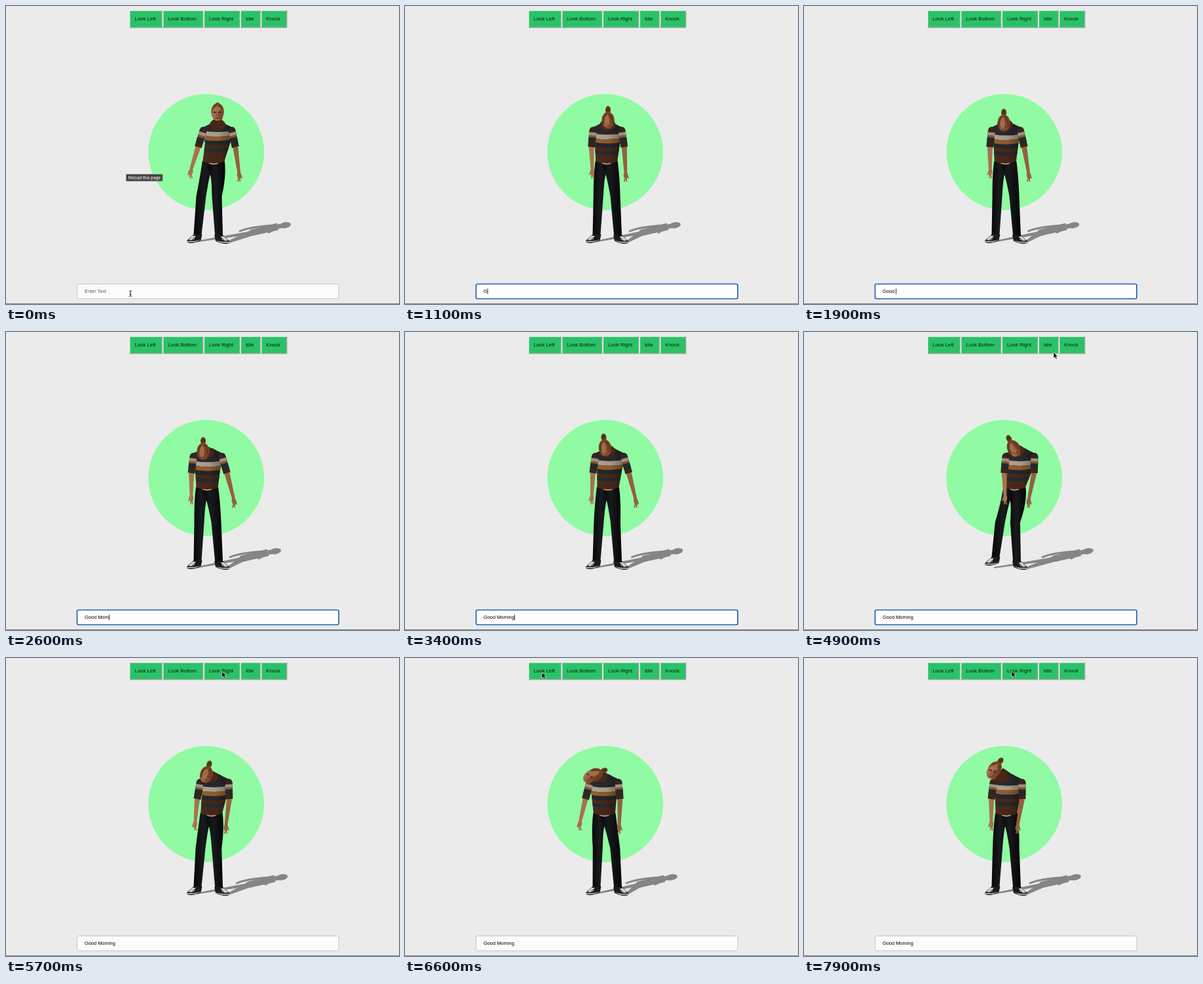
An HTML page that plays this animation: 600x454 px, repeating every 8000 ms.

```html
<!DOCTYPE html>
<html lang="en">
<head>
<meta charset="utf-8">
<title>Text input character</title>
<style>
html, body { margin: 0; width: 100%; height: 100%; overflow: hidden; background: #ebebeb; }
svg { display: block; width: 600px; height: 454px; }
text { font: 7.8px "Liberation Sans", Arial, sans-serif; fill: #0c1a12; white-space: pre; }
#typed { font-size: 7.4px; }
#tip text { font: 500 6.2px Inter, sans-serif; fill: #f4f4f4; }
</style>
</head>
<body>
<svg viewBox="0 0 600 454">
  <defs>
    <linearGradient id="shade">
      <stop offset="0" stop-color="#000" stop-opacity="0"/>
      <stop offset=".55" stop-color="#000" stop-opacity=".08"/>
      <stop offset="1" stop-color="#000" stop-opacity=".4"/>
    </linearGradient>
    <linearGradient id="denim">
      <stop offset="0" stop-color="#060708"/>
      <stop offset=".4" stop-color="#181a1c"/>
      <stop offset="1" stop-color="#050506"/>
    </linearGradient>
  </defs>
  <rect width="600" height="454" fill="#ebebeb"/>
  <rect y="453" width="600" height="1" fill="#7d7d7d"/>
  <circle cx="305.7" cy="222.5" r="88.4" fill="#90fba3"/>
  <g id="buttons"></g>
  <g id="figure"></g>
  <g id="tip">
    <rect x="183.5" y="256.3" width="55.5" height="10.5" fill="#424242" stroke="#777" stroke-width=".7"/>
    <text x="186.8" y="263.7">Reload this page</text>
  </g>
  <rect id="field" x="108.5" y="423.5" width="399.5" height="22.5" rx="2.2"/>
  <text id="typed" x="120" y="437"></text>
  <rect id="caret" y="430.5" width=".8" height="8.5"/>
  <g id="pointer"></g>
</svg>
<script>
const $ = id => document.getElementById(id);
const LOOP = 8000, STEP = 100, MESSAGE = "Good Morning";
const TYPE_START = 1050, TYPE_RATE = 187, TYPE_END = TYPE_START + 11 * TYPE_RATE;
const FOCUS = 500, BLUR = 5200, PRESS = 200;

// Key poses: chest x, head offset, nod, head turn in degrees, reach of each hand from the chest
const POSES = [
  { t: 0,    chest: 323, lean: 0,   nod: 0,   turn: 0,   left: 41, right: 33 },
  { t: 1100, chest: 309, lean: 1,   nod: .7,  turn: 0,   left: 23, right: 28 },
  { t: 2600, chest: 308, lean: -7,  nod: 1.1, turn: 0,   left: 25, right: 40 },
  { t: 4100, chest: 316, lean: -7,  nod: .6,  turn: -13, left: 29, right: 40 },
  { t: 4900, chest: 330, lean: -10, nod: .85, turn: -26, left: 23, right: 13 },
  { t: 6600, chest: 304, lean: -15, nod: .9,  turn: 66,  left: 37, right: 23 },
  { t: 7900, chest: 311, lean: -20, nod: .45, turn: 35,  left: 25, right: 15 }
];
const CURSOR = [
  { t: 0, x: 190, y: 438 }, { t: 3700, x: 190, y: 438 }, { t: 4100, x: 194, y: 422 },
  { t: 4900, x: 381, y: 31 }, { t: 5300, x: 372, y: 20 }, { t: 6500, x: 209, y: 22 },
  { t: 6900, x: 209, y: 22 }, { t: 7900, x: 317, y: 20 }
];

const mix = (a, b, k) => a + (b - a) * k;
const between = (a, b, k) => a.map((v, i) => mix(v, b[i], k));

// Eased state between the neighbouring keys
function sample(keys, t) {
  const i = keys.findIndex(k => k.t > t);
  if (i < 0) return keys[keys.length - 1];
  const a = keys[i - 1], b = keys[i], k = (t - a.t) / (b.t - a.t), ease = k * k * (3 - 2 * k);
  return Object.fromEntries(Object.keys(a).map(name => [name, mix(a[name], b[name], ease)]));
}

const path = (d, fill, extra = "") => `<path d="${d}" fill="${fill}" ${extra}/>`;
const line = (d, color, width) => path(d, "none", `stroke="${color}" stroke-width="${width}" stroke-linecap="round"`);
const oval = (x, y, rx, ry, fill, turn = 0) =>
  `<ellipse rx="${rx}" ry="${ry}" fill="${fill}" transform="translate(${x} ${y}) rotate(${turn})"/>`;

// Tapered bar from a to b
function limb(a, b, wa, wb, fill) {
  const dx = b[0] - a[0], dy = b[1] - a[1], n = Math.hypot(dx, dy) || 1;
  const px = -dy / n / 2, py = dx / n / 2;
  return path(`M${a[0] + px * wa} ${a[1] + py * wa}L${b[0] + px * wb} ${b[1] + py * wb}` +
    `L${b[0] - px * wb} ${b[1] - py * wb}L${a[0] - px * wa} ${a[1] - py * wa}Z`, fill);
}

function arm(shoulder, hand, side, skin) {
  const elbow = [mix(shoulder[0], hand[0], .3) + side * 2, 215], [x, y] = hand;
  const turn = Math.atan2(y - elbow[1], x - elbow[0]) * 180 / Math.PI - 90;
  const band = (u, v, color) => limb(between(shoulder, elbow, u), between(shoulder, elbow, v), 11, 11, color);
  return limb(elbow, hand, 8, 4.5, skin) + oval(x, y + 2, 3.2, 5.5, skin, turn) +
    line(`M${x} ${y + 4}l${-side * 2} 7M${x + side} ${y + 5}l0 6M${x + side * 2} ${y}l${side * 2} 6`, skin, 1.7) +
    oval(...shoulder, 5.5, 6, "#33251f") + band(0, 1, "#3a241c") +
    band(.1, .3, "#9b9081") + band(.3, .42, "#87542a") + band(.42, .75, "#25282d");
}

function torso(sl, sr, chest, waist, nod) {
  const wl = [waist - 16.5, 237], wr = [waist + 16.5, 237];
  const d = `M${chest - 7} 177Q${chest - 13} 181 ${sl[0] - 3} 186L${sl[0] + 3} 209L${wl}` +
    `Q${waist} 243 ${wr}L${sr[0] - 3} 209L${sr[0] + 3} 186Q${chest + 13} 181 ${chest + 7} 177Z`;
  const edge = (u, side) => {
    const [x, y] = side < 0 ? between(sl, wl, u) : between(sr, wr, u);
    return [x + side * 9, y];
  };
  let top = -.4;
  const band = (size, color) => {
    const a = edge(top, -1), b = edge(top, 1), e = edge(top += size, 1), f = edge(top, -1);
    return path(`M${a}Q${chest} ${a[1] + 8} ${b}L${e}Q${chest} ${e[1] + 8} ${f}Z`, color);
  };
  const bands = band(.36 + nod * .12, "#2b2a2e") + band(.15, "#b0a698") + band(.14, "#97602e") +
    band(.14, "#24292c") + band(.11, "#4c291c") + band(.12, "#262d32");
  return `<clipPath id="shirt"><path d="${d}"/></clipPath>` + path(d, "#4c291c") +
    `<g clip-path="url(#shirt)">${bands}</g>` + path(d, "url(#shade)");
}

function leg(waist, side, ankle, bottom) {
  const shift = waist - 307, knee = 308 + side * 12.5 + shift * (side < 0 ? .3 : .1);
  const crotch = 306 + shift * .6, hip = waist + side * 17;
  return path(`M${hip} 236Q${hip + side * 3} 258 ${knee + side * 8} 290L${ankle + side * 6} ${bottom}` +
    `Q${ankle} ${bottom + 2} ${ankle - side * 6} ${bottom}L${knee - side * 7} 290` +
    `Q${crotch + side * 2} 262 ${crotch} 257L${waist - side * 8} 236Z`, "url(#denim)") +
    `<g transform="translate(${ankle} ${bottom}) scale(${side} 1)">` +
    path("M-7 0L6 0L15 8Q19 12 13 13Q4 14 -5 9Z", "#1b1b19") + path("M3 2L8 2L14 8Q9 10 5 7Z", "#d0d0c7") +
    path("M-5 8L5 10L17 10L16 12L4 12Z", "#a3a298") + line("M4 4L8 8", "#33322f", 1) + "</g>";
}

function shadow(chest) {
  const x = chest + 112, tone = "#858585", hip = [x - 58, 345], neck = [x - 20, 336];
  return limb([290, 359], hip, 2, 5, tone) + limb([336, 361], hip, 3, 9, tone) + limb(hip, neck, 10, 11, tone) +
    limb(neck, [x - 3, 333], 7, 5, tone) + oval(x - 9, 334, 9, 4.5, tone, -10) + oval(...hip, 6, 5, tone) +
    line(`M${x - 78} 343Q${x - 62} 336 ${x - 22} 334M${x - 24} 340L${x - 34} 345`, tone, 3);
}

function head(chest, lean, nod, turn) {
  const x = chest + lean, y = 161 + nod * 19, front = Math.min(1, Math.max(0, 1 - nod + Math.abs(turn) / 80));
  const bun = -8 - 8 * Math.min(1, nod * 2);
  return limb([chest, 184], [mix(chest, x, .6), Math.max(y, 173)], 19, 14, "#371e16") +
    oval(mix(chest, x, .5), Math.max(181, y + 2), 12, 9, "#482719") +
    `<g transform="translate(${x} ${y}) rotate(${turn})">` +
    oval(0, bun, 4, 6, "#64341f") + line(`M-2 ${bun}l4 -2`, "#3f2014", 1) +
    oval(0, 0, 9.8, 13, "#754329") + oval(-2, 0, 4, 9, "#a06b45") +
    line("M-3 -9Q-7 -4 -7 4M3 -9Q7 -4 7 4", "#552c1b", 1.2) +
    `<g transform="translate(0 ${3 + 6 * nod}) rotate(${-turn * .4}) scale(${mix(.6, 1, front)} ${front})">` +
    oval(-.5, 0, 8.2, 11, "#a36c49") + oval(4.5, 2, 3.8, 8.5, "#7d4b2f") +
    line("M-5.5 -2h3M1.5 -2h3", "#2e1a13", 1.6) + line("M-1 -1l-1 5l2 .5", "#744429", 1) +
    line("M-3 7h5", "#6b2c22", 1.3) + "</g></g>";
}

function figure(t) {
  const { chest, lean, nod, turn, left, right } = sample(POSES, t);
  const waist = 307 + (chest - 308) * .65, lift = Math.max(0, waist - 317) * 1.2;
  const sl = [chest - 22, 190], sr = [chest + 22, 190];
  return shadow(chest) + leg(waist, -1, 292.5, 348 - lift) + leg(waist, 1, 325, 349) +
    oval(waist, 239, 7.5, 2.5, "#cfb094") + torso(sl, sr, chest, waist, nod) +
    arm(sl, [chest - left, 251], -1, "#a9714e") + arm(sr, [chest + right, 256], 1, "#94603f") +
    head(chest, lean, nod, turn);
}

// Each button is as wide as its label plus padding
const LABELS = ["Look Left", "Look Bottom", "Look Right", "Idle", "Knock"];
$("buttons").innerHTML = LABELS.map(label =>
  `<g>${path("", "#a6a6a6")}${path("", "#f2f2f2")}${path("", "#2ac267")}<text y="22">${label}</text></g>`).join("");
let edgeX = 188;
for (const group of $("buttons").children) {
  const [low, high, face, label] = group.children;
  const a = edgeX, b = edgeX += label.getComputedTextLength() + 18.8;
  low.setAttribute("d", `M${a} 6H${b}V33.5H${a}Z`);
  high.setAttribute("d", `M${a} 6H${b}L${b - 1.5} 7.5L${a + 1.5} 32L${a} 33.5Z`);
  face.setAttribute("d", `M${a + 1.4} 7.4H${b - 1.4}V32.2H${a + 1.4}Z`);
  label.setAttribute("x", a + 8.4);
}

function press(index) {
  [...$("buttons").children].forEach(({ children: [low, high] }, i) => {
    low.setAttribute("fill", i === index ? "#f2f2f2" : "#a6a6a6");
    high.setAttribute("fill", i === index ? "#a6a6a6" : "#f2f2f2");
  });
}

function pointer(t) {
  if (t >= 1000 && t < 3700) return "";
  const { x, y } = sample(CURSOR, t);
  const shape = y > 421.5
    ? line("M-1.8 -4q1.8 0 1.8 1.2v6q0 1.2 -1.8 1.2M1.8 -4q-1.8 0 -1.8 1.2M0 3q0 1.4 1.8 1.4M-1 1h2", "#111", .9)
    : path("M0 0v9l2.1 -1.9l1.6 3.4l1.6 -.7l-1.6 -3.3h2.8Z", "#000", 'stroke="#fff" stroke-width=".6"');
  return `<g transform="translate(${x} ${y})">${shape}</g>`;
}

function draw(t) {
  const within = (start, length) => t >= start && t < start + length;
  const focused = t >= FOCUS && t < BLUR;
  const count = t < TYPE_START ? 0 : 1 + Math.floor((t - TYPE_START) / TYPE_RATE);
  press(within(BLUR, PRESS) ? 3 : within(6700, PRESS) ? 0 : -1);
  $("figure").innerHTML = figure(t);
  $("pointer").innerHTML = pointer(t);
  $("tip").setAttribute("opacity", Math.min(1, Math.max(0, (500 - t) / 300)));

  const field = $("field"), typed = $("typed"), caret = $("caret");
  field.setAttribute("fill", focused ? "#fff" : "#fbfbfb");
  field.setAttribute("stroke", focused ? "#1d62b4" : "#c6c6c6");
  field.setAttribute("stroke-width", focused ? 1.7 : 1);
  typed.textContent = count ? MESSAGE.slice(0, count) : "Enter Text";
  typed.style.fill = count ? "#000" : "#5c5c5c";
  const blinkOn = t < TYPE_END || (t - TYPE_END) % 1060 < 530;
  caret.setAttribute("x", 120 + (count ? typed.getComputedTextLength() : 0));
  caret.setAttribute("opacity", focused && blinkOn ? 1 : 0);
}

let last = -1;
function tick() {
  const t = Math.floor(performance.now() % LOOP / STEP) * STEP;
  if (t !== last) draw(last = t);
  requestAnimationFrame(tick);
}
tick();
</script>
</body>
</html>
```
